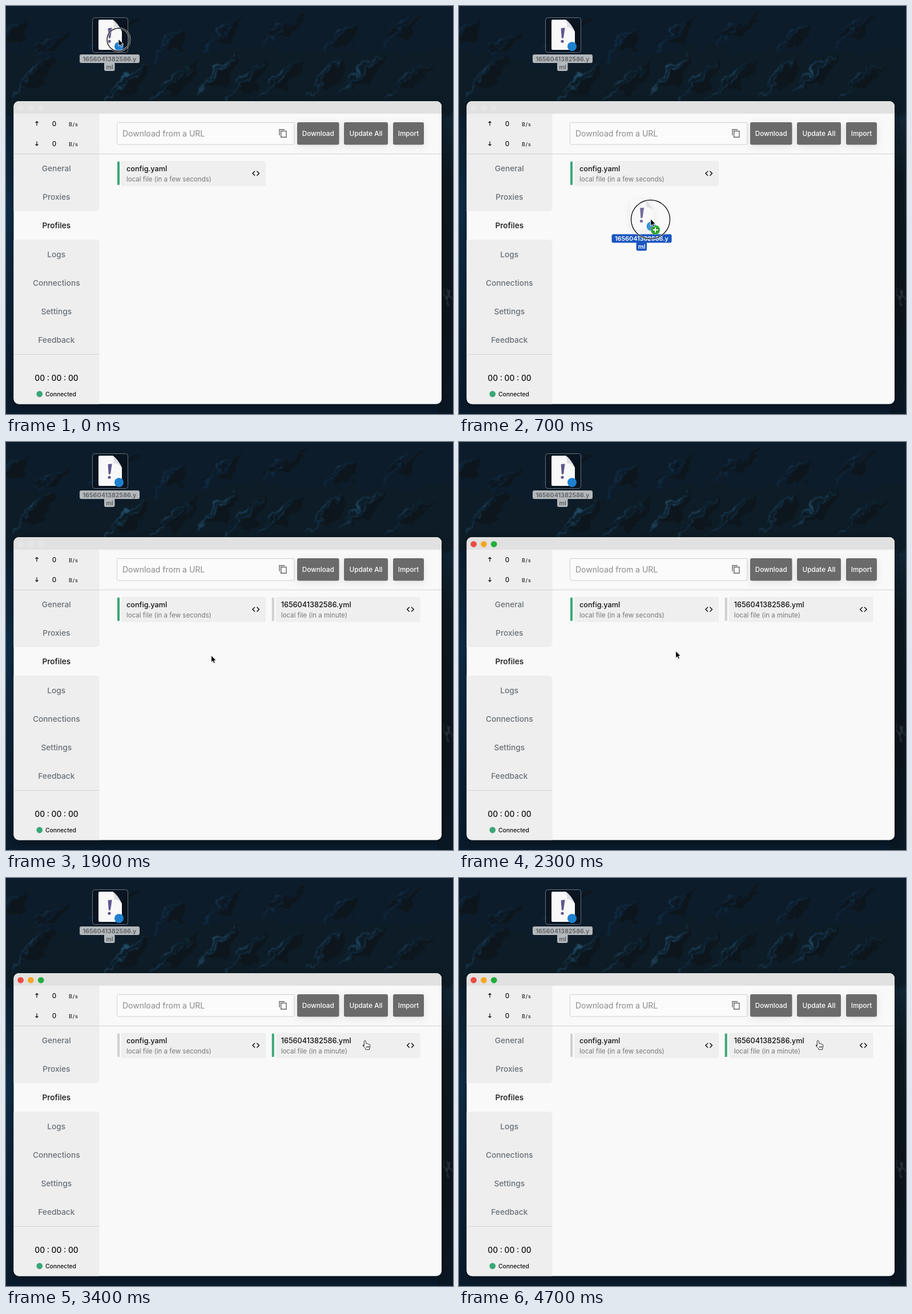
An HTML page that plays this animation: 783 by 716 pixels, repeating every 4.8 s.

```html
<!DOCTYPE html>
<html lang="en">
<head>
<meta charset="utf-8">
<title>Import a profile by dragging</title>
<style>
  html, body { margin: 0; width: 100%; height: 100%; overflow: hidden; background: #0a1828; }
  svg { display: block; width: 783px; height: 716px; font-family: Inter, Roboto, sans-serif; }
  .mid { text-anchor: middle; }
  .medium { font-weight: 500; }
  .bold { font-weight: 600; }
  .line { fill: none; stroke: #d2d2d2; }
</style>
</head>
<body>
<svg viewBox="0 0 783 716">
  <defs>
    <linearGradient id="sea" x2="0" y2="1">
      <stop offset="0" stop-color="#0b1c2c"/>
      <stop offset=".25" stop-color="#0b1e2e"/>
      <stop offset=".5" stop-color="#0d2c46"/>
      <stop offset=".75" stop-color="#0a2238"/>
      <stop offset="1" stop-color="#0a1b2b"/>
    </linearGradient>
    <linearGradient id="coast" x2="0" y2="1">
      <stop offset="0" stop-color="#12293a"/>
      <stop offset=".25" stop-color="#0c181f"/>
      <stop offset=".7" stop-color="#0c151b"/>
      <stop offset="1" stop-color="#0a1824"/>
    </linearGradient>
    <filter id="rock" x="-5%" y="-20%" width="110%" height="140%">
      <feTurbulence type="fractalNoise" baseFrequency=".045" numOctaves="3" seed="4"/>
      <feDisplacementMap in="SourceGraphic" scale="26" xChannelSelector="R" yChannelSelector="G"/>
      <feGaussianBlur stdDeviation=".9"/>
    </filter>
    <filter id="shade" x="-30%" y="-60%" width="160%" height="220%">
      <feDropShadow dx="0" dy="3" stdDeviation="7" flood-opacity=".09"/>
    </filter>
    <filter id="drop" x="-10%" y="-10%" width="120%" height="120%">
      <feDropShadow dx="0" dy="4" stdDeviation="7" flood-opacity=".35"/>
    </filter>
    <clipPath id="frame"><rect x="13.5" y="167" width="749.5" height="531.5" rx="9"/></clipPath>
    <g id="page">
      <path d="M164 24H187Q195 29 203 45V75Q203 77 201 77H164Q162 77 162 75V26Q162 24 164 24Z" fill="#f8f8f9"/>
      <path d="M187 24Q190 30 189 37Q197 37 203 45Q195 29 187 24Z" fill="#dcdde1"/>
      <path d="M178.6 39L185.6 38.3L183 56.5H179.8Z" fill="#61558f"/>
      <circle cx="181" cy="62" r="2.6" fill="#61558f"/>
      <circle cx="198" cy="71" r="8" fill="#1f80cf"/>
    </g>
  </defs>

  <rect width="783" height="716" fill="url(#sea)"/>
  <rect x="755" y="160" width="28" height="556" fill="url(#coast)"/>
  <g id="hills" filter="url(#rock)"></g>

  <rect x="151.5" y="20.5" width="62" height="61" rx="4" fill="#08111c" fill-opacity=".65" stroke="#68737e"/>
  <use href="#page"/>
  <g id="label"></g>

  <rect x="13.5" y="167" width="749.5" height="531.5" rx="9" fill="#f9f9f9" filter="url(#drop)"/>
  <g clip-path="url(#frame)">
    <rect x="13" y="167" width="751" height="22" fill="#e1e1e1"/>
    <path d="M13 189H163.5V353Q163.5 360 156.5 360H13ZM13 410H156.5Q163.5 410 163.5 417V699H13Z" fill="#eee"/>
    <path d="M13 259.5H764M13 611.5H163.5" class="line"/>
  </g>
  <g id="lights"></g>
  <g id="ui"></g>

  <g id="ghost">
    <use href="#page" opacity=".85" filter="url(#shade)"/>
    <g id="ghostLabel"></g>
  </g>
  <g id="pointer">
    <g id="plus">
      <circle cx="8.5" cy="19.5" r="8" fill="#2c9f2f" stroke="#78c47a" stroke-width=".8"/>
      <path d="M4 19.5H13M8.5 15V24" stroke="#fff" stroke-width="2"/>
    </g>
    <g id="ring" fill="none">
      <circle cy="1" stroke="#fff" stroke-width="3" stroke-opacity=".75"/>
      <circle cy="1" stroke="#111" stroke-width="1.4"/>
    </g>
    <path id="arrow" d="M0 0V12.4L2.8 9.8L4.7 14L6.8 13.1L5 9H8.8Z" fill="#000" stroke="#fff" stroke-width=".9"/>
    <path id="hand" fill="#fff" stroke="#222" d="M-1.7 9V.8Q-1.6-.7-.2-.7Q1.2-.7 1.4 .8L1.9 4.8Q3.3 4 4.2 5.2Q5.7 4.5 6.5 5.8
      Q8.4 5.4 8.7 7.4V10.4Q8.5 12 7.6 13V15H.9V13.3Q-1.5 11.3-3.7 8.2Q-4 6.8-2.8 6.8ZM2.4 9v3M4.5 9v3M6.5 9v3"/>
  </g>
</svg>
<script>
const $ = id => document.getElementById(id);
const text = (x, y, size, fill, str, cls = '', spacing = 0) =>
  `<text x="${x}" y="${y}" font-size="${size}" fill="${fill}" class="${cls}" letter-spacing="${spacing}">${str}</text>`;
const box = (x, y, w, h, r, fill, extra = '') =>
  `<rect x="${x}" y="${y}" width="${w}" height="${h}" rx="${r}" fill="${fill}" ${extra}/>`;
const show = (id, on) => $(id).style.display = on ? '' : 'none';

// A spur falls from its crest: a shadowed flank, a lit flank and a few thin ribs
const shape = (d, fill, opacity = 1) => `<path d="${d}" fill="${fill}" opacity="${opacity}"/>`;
function spur(x, y, dx, dy, lit) {
  let out = shape(`M${x} ${y}l${dx} ${dy}h44z`, '#08121b', .75) +
    shape(`M${x} ${y}l${dx * .5 - 9} ${dy * .42}L${x + dx} ${y + dy}l${-dx * .45} ${-dy * .6}z`, lit, .8);
  for (let i = 1; i < 5; i++)
    out += shape(`M${x + dx * i / 5} ${y + dy * i / 5}l-16 ${8 + i * 3}l-7 11l13-14z`, lit, .55);
  return out;
}
const far = [[40, 22], [115, 40], [235, 18], [320, 36], [420, 20], [530, 12], [620, 25], [735, 10]];
const near = [[85, 88], [255, 98], [345, 96], [408, 84], [462, 98], [530, 90], [600, 88], [668, 82], [755, 92]];
$('hills').innerHTML =
  shape('M-20 -20H810V190H-20Z', '#0b1b2a') +
  far.map(([x, y], i) => spur(x, y, -58 - i % 3 * 12, 42, '#173b57')).join('') +
  shape('M-20 78L70 88L150 116L240 98L300 86L400 76L450 70L520 86L600 76L690 86L810 72V190H-20Z', '#0f1c25') +
  near.map(([x, y], i) => spur(x, y, -66 - i % 3 * 10, 56, i % 2 ? '#255577' : '#1e4866')).join('') +
  shape('M766 505l18-4v3l-18 4zM768 497h2v24h-2zM777 499h2v20h-2z', '#444d55', .7);

const label = (bg, fg) => box(129, 85, 105, 15, 3, bg) + box(172, 98, 18.5, 16, 3, bg) +
  text(181.5, 96.5, 10.8, fg, '1656041382586.y', 'mid bold') +
  text(181.5, 110.5, 10.8, fg, 'ml', 'mid bold');
$('label').innerHTML = label('#b4b8bb', '#5b6064');
$('ghostLabel').innerHTML = label('#1956c0', '#fff');

const card = (x, id, name, note) =>
  box(x, 273, 4, 41, 1, '#d0d0d0', `id="${id}"`) + box(x + 7, 272, 253, 44, 2, '#efefef') +
  text(x + 16, 290, 12.7, '#111', name, 'medium') + text(x + 16, 308, 11.5, '#777', note) +
  `<path d="M${x + 241} 289.8l-4 4l4 4m3.4-8l4 4l-4 4" fill="none" stroke="#111" stroke-width="1.5"/>`;

const rate = (y, arrow) =>
  `<path d="M54 ${y - 8}v7.5${arrow}" fill="none" stroke="#111" stroke-width="1.2"/>` +
  text(84.5, y, 11.5, '#111', '0', 'mid medium') + text(110, y, 9, '#222', 'B/s', 'medium', .9);

const button = (x, w, str) => box(x, 204, w, 39.5, 3, '#6b6b6b', 'filter="url(#shade)"') +
  text(x + w / 2, 228.2, 11.7, '#fff', str, 'mid medium');

$('ui').innerHTML =
  rate(210.5, 'M51.5 205l2.5-2.5l2.5 2.5') + rate(245.5, 'M51.5 242.5l2.5 2.5l2.5-2.5') +
  ['General', 'Proxies', 'Profiles', 'Logs', 'Connections', 'Settings', 'Feedback'].map((str, i) =>
    text(88.3, 289.8 + i * 50.25, 13.7, i === 2 ? '#111' : '#686f76', str, 'mid medium')).join('') +
  text(88.5, 657.5, 13.8, '#111', '00 : 00 : 00', 'mid medium') +
  '<circle cx="58.7" cy="681" r="5.4" fill="#3aa776"/>' +
  text(69, 684.8, 10.3, '#111', 'Connected', 'medium') +
  box(194.5, 204.5, 310.5, 38.5, 2, '#fbfbfb', 'stroke="#cfcfcf"') +
  text(204, 229.2, 14, '#8a8a8a', 'Download from a URL') +
  '<path d="M479 227V216.7H488M481.7 219.5H491V230.3H481.7Z" fill="none" stroke="#666" stroke-width="1.4"/>' +
  button(510, 73.5, 'Download') + button(592, 77, 'Update All') + button(678, 54, 'Import') +
  card(195, 'first', 'config.yaml', 'local file (in a few seconds)') +
  `<g id="added">${card(465.7, 'second', '1656041382586.yml', 'local file (in a minute)')}</g>`;

// Pointer stops: time, x, y
const start = [197, 58];
const stops = [
  [0, ...start], [100, ...start], [600, 335.5, 373.5], [700, 335.5, 373.5], [1000, 336.5, 377.5],
  [1600, 336.5, 377.5], [1900, 359.5, 374.5], [2200, 359.5, 374.5], [2800, 631.5, 271],
  [2900, 631.5, 271], [3100, 629, 286], [4800, 629, 286],
];
function pointerAt(t) {
  const i = stops.findIndex((s, n) => n && t < s[0]);
  const [t0, x0, y0] = stops[i - 1], [t1, x1, y1] = stops[i];
  const u = (t - t0) / (t1 - t0), e = u * u * (3 - 2 * u);
  return [x0 + (x1 - x0) * e, y0 + (y1 - y0) * e];
}

function draw(now) {
  const t = Math.floor(now % 4800 / 100) * 100;
  const [x, y] = pointerAt(t);
  const radius = t < 800 ? Math.min(34, 20 + t * .1) : 34 - (t - 800) * .14;
  const dragging = t >= 100 && t < 900;
  const active = t >= 2200, switched = t >= 3200, over = t >= 3000;

  $('pointer').setAttribute('transform', `translate(${x} ${y})`);
  $('ghost').setAttribute('transform', `translate(${x - start[0]} ${y - start[1]})`);
  for (const c of $('ring').children) c.setAttribute('r', Math.max(0, radius));
  show('ghost', dragging);
  show('plus', dragging && y > 190);
  show('ring', t < 1000);
  show('arrow', !over);
  show('hand', over);
  show('added', t >= 1000);
  $('first').setAttribute('fill', switched ? '#d0d0d0' : '#3aa776');
  $('second').setAttribute('fill', switched ? '#3aa776' : '#d0d0d0');
  $('lights').innerHTML = ['#ed4b42', '#f5a623', '#22ad3c'].map((color, i) =>
    `<circle cx="${25.6 + i * 17.8}" cy="179.3" r="5.4" fill="${active ? color : '#e6e6e6'}"/>`).join('');
  requestAnimationFrame(draw);
}
requestAnimationFrame(draw);
</script>
</body>
</html>
```
